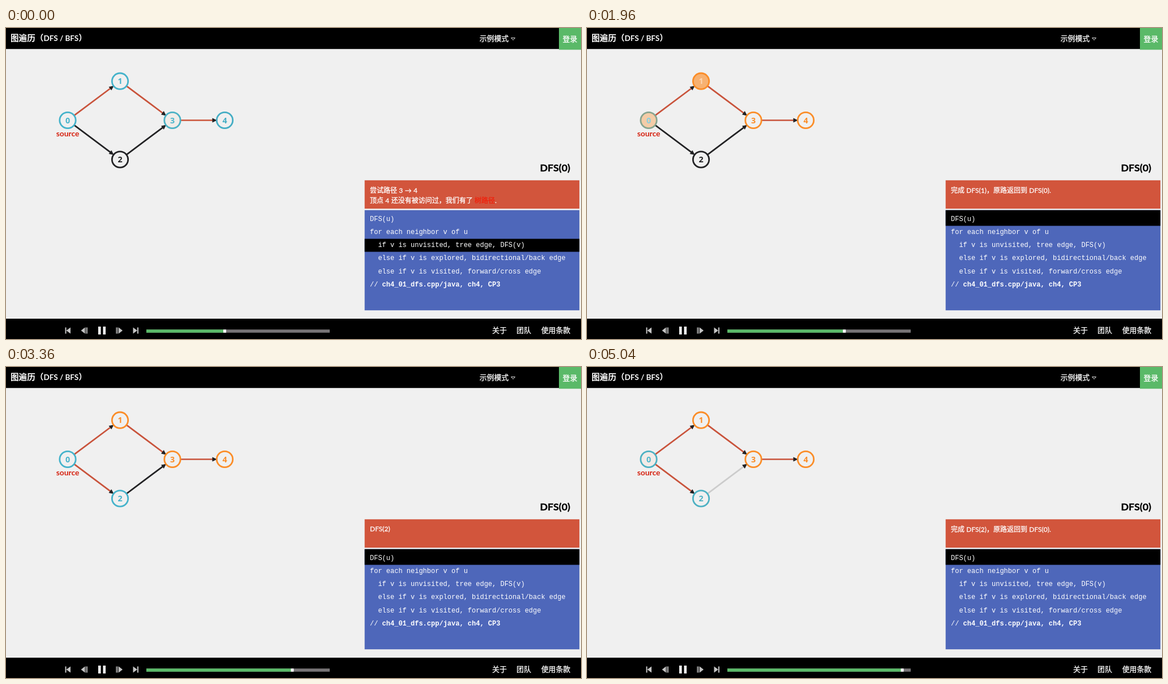
These frames come from a looping animation (1016x551 px, 5.11 s). An HTML page:

```html
<!DOCTYPE html>
<html lang="zh-CN">
<head>
<meta charset="utf-8">
<title>图遍历</title>
<style>
  html, body { margin: 0; width: 100%; height: 100%; overflow: hidden; background: #f0f0f0; }
  svg { display: block; width: 1016px; height: 551px; }
  text { font-family: Lato, "Noto Sans CJK SC", "Noto Sans CJK", sans-serif; color: #fff; fill: currentColor; white-space: pre; }
  .bold { font-weight: 700; }
  .menu, .status, .title { stroke: currentColor; stroke-width: .3px; }
  .menu { font-size: 12.9px; }
  .status { font-size: 12px; word-spacing: .3px; }
  .status tspan { fill: currentColor; stroke: currentColor; }
  .code text { font: 12px "Liberation Mono", "Courier New", monospace; }
  .digit { font: 700 14.3px "Open Sans", "Noto Sans", sans-serif; text-anchor: middle; }
</style>
</head>
<body>
<svg viewBox="0 0 1016 551">
  <rect width="1016" height="551" fill="#f0f0f0"/>
  <rect width="1016" height="37.2" fill="#000"/>
  <text class="bold" x="8" y="23" font-size="14.6">图遍历（<tspan font-size="13.5">DFS / BFS</tspan>）</text>
  <text class="menu" x="836.7" y="23">示例模式</text>
  <path d="M892.5 17.5h7l-3.5 4z" fill="none" stroke="#ddd"/>
  <rect x="977" width="39" height="38.5" fill="#5ab968"/>
  <text class="menu" x="983.5" y="24">登录</text>

  <g id="edges"></g>
  <g id="nodes"></g>
  <text class="bold" x="109" y="192" font-size="13.8" text-anchor="middle" style="color:#d5200f">source</text>
  <text class="bold title" x="997" y="253.5" font-size="17.9" text-anchor="end" style="color:#000">DFS(0)</text>

  <rect x="633.7" y="269.8" width="379.5" height="50.3" fill="#d2553c"/>
  <text class="status" id="line1" x="643"></text>
  <text class="status" x="643" y="310"><tspan id="line2"></tspan><tspan id="kind"></tspan><tspan id="dot"></tspan></text>
  <rect x="633.7" y="322.7" width="379.5" height="177.5" fill="#4e67ba"/>
  <rect id="highlight" x="633.7" width="379.5" fill="#000"/>
  <g class="code" id="code"></g>

  <rect y="515" width="1016" height="36" fill="#000"/>
  <g fill="#c4c4c4">
    <path id="first" d="M104.5 530.5h2v11h-2zM114 530.5v11l-7.5-5.5z"/>
    <path id="back" d="M139.5 530.5v11l-7-5.5zM140.5 530.5h1.2v11h-1.2zM142.6 530.5h1.4v11h-1.4z"/>
    <use href="#first" transform="translate(338.5)scale(-1 1)"/>
    <use href="#back" transform="translate(338.5)scale(-1 1)"/>
  </g>
  <path d="M163 529h4.5v14H163zM171.5 529h4.5v14h-4.5z" fill="#fff"/>
  <rect x="248" y="534.2" width="324" height="5.6" fill="#777476"/>
  <rect id="done" x="248" y="534.2" height="5.6" fill="#5ab968"/>
  <rect id="knob" y="534.2" width="5" height="5.6" fill="#fff"/>
  <text class="menu" x="859" y="540">关于</text>
  <text class="menu" x="902" y="540">团队</text>
  <text class="menu" x="945.7" y="540">使用条款</text>
</svg>
<script>
const LOOP = 5110, TICK = 70;
const FIRST_STEP = 8, LAST_STEP = 18, TOTAL_STEPS = 19;
const FIRST_START = -393, STEP_MS = 532, FADE_MS = 500;

const ORANGE = [251, 141, 40], CYAN = [69, 179, 203], BLACK = [34, 34, 36];
const RED = [201, 83, 59], GREY = [204, 204, 204], PAPER = [240, 240, 240], WHITE = [255, 255, 255];

// Node looks: [fill, ring, digit]
const LOOKS = {
  k: [PAPER, BLACK, BLACK], c: [PAPER, CYAN, CYAN],
  o: [PAPER, ORANGE, ORANGE], f: [ORANGE, ORANGE, WHITE]
};
const EDGE_COLORS = { k: BLACK, o: ORANGE, r: RED, g: GREY };
const POINTS = [[109, 163.5], [201.5, 94.2], [201.5, 233], [294, 163.5], [386.5, 163.5]];
const LINKS = [[0, 1], [1, 3], [3, 4], [0, 2], [2, 3]];

const tryEdge = (u, v) => ({ row: 1, text: `尝试边 ${u} → ${v}` });
const visit = u => ({ row: 0, text: `DFS(${u})`, y: 291 });
const finish = (u, v) => ({ row: 0, text: `完成 DFS(${u})，原路返回到 DFS(${v}).` });
const treeEdge = (u, v) => ({
  row: 2, text: `尝试路径 ${u} → ${v}`, more: `顶点 ${v} 还没有被访问过，我们有了 `, kind: "树路径", color: "#f0210c"
});
const crossEdge = (u, v) => ({
  row: 4, text: `尝试路径 ${u} → ${v}`, more: `顶点 ${v} 已经被访问过，我们有了 `, kind: "前向/交叉边", color: "#ccc"
});

// One entry per step, starting with the step before the first one shown
const STEPS = [
  ["cckfk", "rrokk", tryEdge(3, 4)],
  ["cckcc", "rrrkk", treeEdge(3, 4)],
  ["cckcf", "rrrkk", visit(4)],
  ["cckfo", "rrrkk", finish(4, 3)],
  ["cfkoo", "rrrkk", finish(3, 1)],
  ["fokoo", "rrrkk", finish(1, 0)],
  ["fokoo", "rrrok", tryEdge(0, 2)],
  ["cocoo", "rrrrk", treeEdge(0, 2)],
  ["cofoo", "rrrrk", visit(2)],
  ["cofoo", "rrrro", tryEdge(2, 3)],
  ["cocoo", "rrrrg", crossEdge(2, 3)],
  ["foooo", "rrrrg", finish(2, 0)]
];

const $ = id => document.getElementById(id);
function add(parent, tag, attrs, text = "") {
  const el = document.createElementNS("http://www.w3.org/2000/svg", tag);
  for (const name in attrs) el.setAttribute(name, attrs[name]);
  el.textContent = text;
  return parent.appendChild(el);
}

const edges = LINKS.map(([a, b]) => {
  const [x1, y1] = POINTS[a], [x2, y2] = POINTS[b];
  const length = Math.hypot(x2 - x1, y2 - y1);
  const angle = Math.atan2(y2 - y1, x2 - x1) * 180 / Math.PI;
  const group = add($("edges"), "g", { transform: `translate(${x1} ${y1}) rotate(${angle})` });
  const line = add(group, "path", { d: `M14 0H${length - 18}`, "stroke-width": 2.7 });
  add(group, "path", { d: `M${length - 13.5} 0l-8.5-4v8z`, fill: "#222224" });
  return line;
});

const nodes = POINTS.map(([x, y], i) => ({
  circle: add($("nodes"), "circle", { cx: x, cy: y, r: 14.2, "stroke-width": 2.8 }),
  digit: add($("nodes"), "text", { x, y: y + 5.2, class: "digit" }, i)
}));

[
  "DFS(u)",
  "for each neighbor v of u",
  "  if v is unvisited, tree edge, DFS(v)",
  "  else if v is explored, bidirectional/back edge",
  "  else if v is visited, forward/cross edge",
  "// "
].forEach((line, i) => {
  const row = add($("code"), "text", { x: 643, y: 342.3 + 23.05 * i }, line);
  if (i === 5) add(row, "tspan", { class: "bold" }, "ch4_01_dfs.cpp/java, ch4, CP3");
});

const ease = p => p < .5 ? 4 * p ** 3 : 1 - 4 * (1 - p) ** 3;
const mix = (a, b, p) => `rgb(${a.map((v, i) => Math.round(v + (b[i] - v) * p))})`;

function showStatus({ row, text, y = 292, more = "", kind = "", color = "" }) {
  $("line1").textContent = text;
  $("line1").setAttribute("y", y);
  $("line2").textContent = more;
  $("kind").textContent = kind;
  $("kind").style.color = color;
  $("dot").textContent = kind && ".";
  $("highlight").setAttribute("y", row ? 327.5 + 23 * row : 322.7);
  $("highlight").setAttribute("height", row ? 23 : 27.8);
}

let shown = -1;
function draw(time) {
  const step = Math.min(LAST_STEP, FIRST_STEP + Math.floor((time - FIRST_START) / STEP_MS));
  const elapsed = time - FIRST_START - (step - FIRST_STEP) * STEP_MS;
  const p = ease(Math.min(1, elapsed / FADE_MS));
  const index = step - FIRST_STEP + 1;
  const [oldNodes, oldEdges] = STEPS[index - 1];
  const [newNodes, newEdges, status] = STEPS[index];

  nodes.forEach(({ circle, digit }, i) => {
    const from = LOOKS[oldNodes[i]], to = LOOKS[newNodes[i]];
    const [fill, ring, ink] = from.map((c, j) => mix(c, to[j], p));
    circle.style.fill = fill;
    circle.style.stroke = ring;
    digit.style.color = ink;
  });
  edges.forEach((line, i) => {
    line.style.stroke = mix(EDGE_COLORS[oldEdges[i]], EDGE_COLORS[newEdges[i]], p);
  });

  if (step !== shown) {
    shown = step;
    showStatus(status);
    const width = 324 * step / TOTAL_STEPS;
    $("done").setAttribute("width", width);
    $("knob").setAttribute("x", 248 + width - .4);
  }
}

const origin = performance.now();
function frame() {
  const time = (performance.now() - origin) % LOOP;
  draw(Math.floor(time / TICK) * TICK);
  requestAnimationFrame(frame);
}
frame();
</script>
</body>
</html>
```
